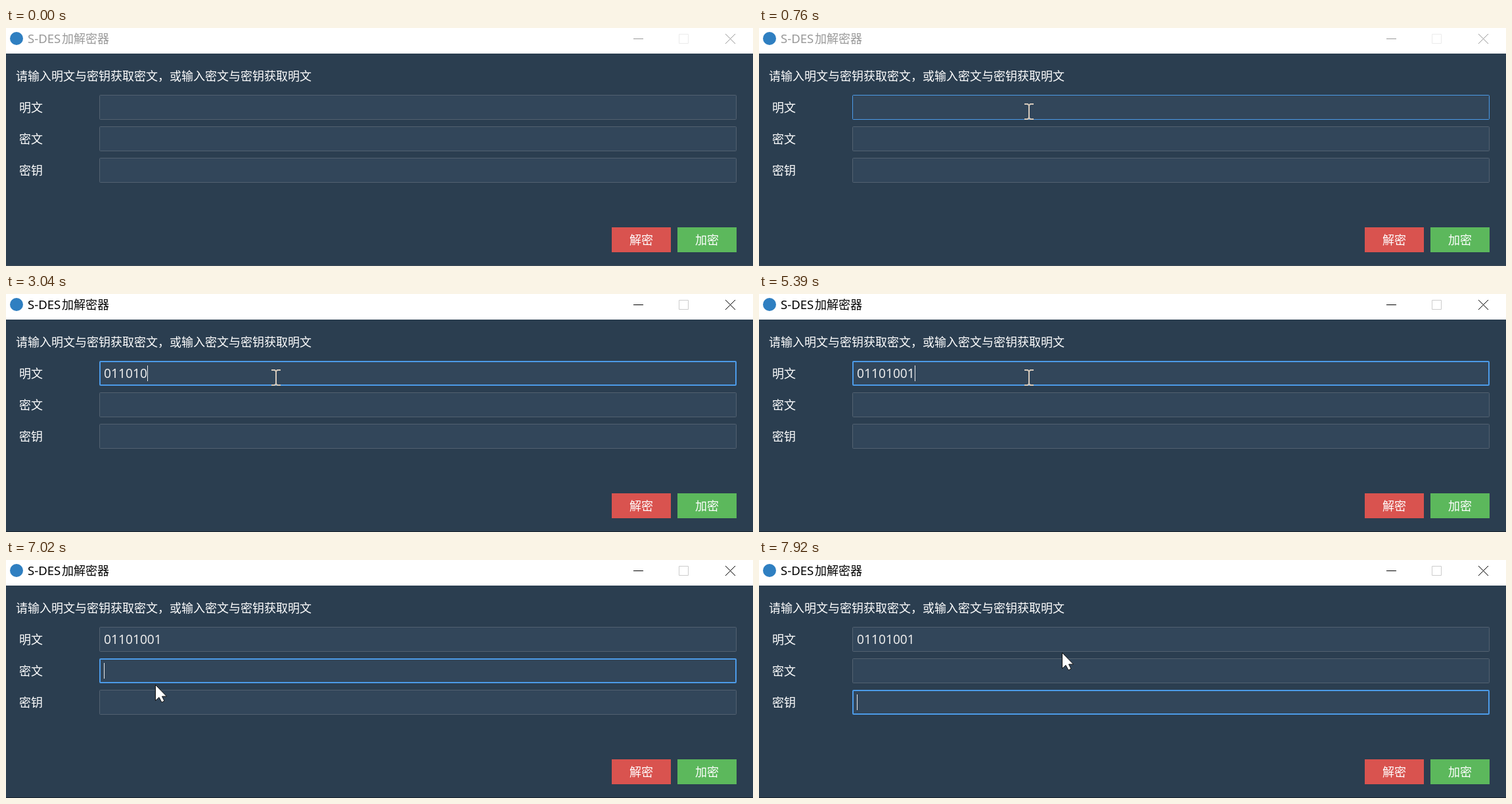
Recreate the animation shown at these times as an HTML page. Size 1137 by 363 pixels, loop 7990 ms.

```html
<!DOCTYPE html>
<html lang="zh-CN">
<head>
<meta charset="utf-8">
<title>S-DES加解密器</title>
<style>
html, body { margin: 0; width: 100%; height: 100%; overflow: hidden; background: #2b3e50; }
svg { display: block; width: 1137px; height: 363px; }
text { font: 18px "Noto Sans CJK SC", "Noto Sans CJK", sans-serif; fill: #fff; white-space: pre; }
.latin { font: 18.6px "Noto Sans", "Open Sans", sans-serif; }
.value { font: 19.2px "Noto Sans", "Open Sans", sans-serif; fill: #ebebeb; }
.button { text-anchor: middle; }
.field { fill: #32465a; stroke: #526170; }
.field.hover, .field.focus { stroke: #4c9be8; }
.field.focus { stroke-width: 2; }
#bar text { fill: var(--ink); }
#bar path { fill: none; stroke: var(--ink); }
#bar .max { stroke: var(--max); }
</style>
</head>
<body>
<svg viewBox="0 0 1137 363">
  <rect width="1137" height="363" fill="#2b3e50"/>
  <rect id="edge" y="362" width="1137" height="1"/>
  <g id="bar">
    <rect width="1137" height="39" fill="#fff"/>
    <circle cx="16" cy="16" r="10" fill="#2f7fc1"/>
    <text class="latin" x="33" y="23">S-DES</text>
    <text x="85" y="23">加解密器</text>
    <path d="M955 16.5h15"/>
    <path class="max" d="M1024.5 9.5h14v14h-14z"/>
    <path d="M1095 9l15 15M1110 9l-15 15"/>
  </g>
  <text x="15" y="80">请输入明文与密钥获取密文，或输入密文与密钥获取明文</text>
  <text x="20" y="128">明文</text>
  <text x="20" y="176">密文</text>
  <text x="20" y="224">密钥</text>
  <rect class="field"/>
  <rect class="field"/>
  <rect class="field"/>
  <text id="value" class="value" x="149" y="128"></text>
  <rect id="caret" width="1" height="24" fill="#ebebeb"/>
  <rect x="922" y="304" width="90" height="38" fill="#d9534f"/>
  <text class="button" x="967" y="330">解密</text>
  <rect x="1022" y="304" width="90" height="38" fill="#5cb85c"/>
  <text class="button" x="1067" y="330">加密</text>
  <path id="arrow" d="M.5 .5V24.5L6 19.5L10 27L14 25L10.5 18H17.5Z" fill="#fff" stroke="#111"/>
  <path id="beam" d="M-7-11h5l2 2v19l-2 2h-5M7-11h-5l-2 2v19l2 2h5" fill="none" stroke="#d5c9bb" stroke-width="2"/>
</svg>
<script>
const LOOP = 7990, STEP = 70;
const $ = id => document.getElementById(id);
const fields = [...document.querySelectorAll('.field')];
const fieldTop = i => 102 + 48 * i;

// Pointer moves: start, end, x and y reached; it rests in between
const moves = [
  [130, 130, 690, 350],
  [130, 760, 411, 127],
  [5520, 5800, 612, 193],
  [5800, 6010, 366, 166],
  [6010, 6360, 304, 162],
  [6670, 7020, 227, 190],
  [7020, 7160, 234, 212],
  [7430, 7920, 461, 141]
];
const clicks = [830, 6490, 7370];
const keys = [1630, 1700, 1970, 2230, 2570, 3040, 4120, 4660];
const message = '01101001';

const passed = (times, t) => times.filter(at => at <= t).length;
const ease = u => u * u * (3 - 2 * u);

function pointerAt(t) {
  const i = moves.findLastIndex(m => m[0] <= t);
  if (i < 0) return null;
  const [start, end, x, y] = moves[i];
  if (t >= end) return [x, y];
  const [, , x0, y0] = moves[i - 1];
  const k = ease(Math.floor((t - start) / STEP) * STEP / (end - start));
  return [x0 + (x - x0) * k, y0 + (y - y0) * k].map(Math.round);
}

function place(el, shown, x, y) {
  el.style.display = shown ? '' : 'none';
  if (shown) el.setAttribute('transform', `translate(${x} ${y})`);
}

function drawField(el, i, focus, hover) {
  const inset = focus ? 1 : 0.5;
  const box = { x: 142 + inset, y: fieldTop(i) + inset, width: 970 - 2 * inset, height: 38 - 2 * inset, rx: 1 };
  for (const name in box) el.setAttribute(name, box[name]);
  el.classList.toggle('focus', focus);
  el.classList.toggle('hover', hover);
}

function draw(t) {
  const pos = pointerAt(t);
  const [x, y] = pos || [0, 0];
  const over = fields.findIndex((_, i) => x >= 142 && x < 1112 && y >= fieldTop(i) && y < fieldTop(i) + 38);
  const focus = passed(clicks, t) - 1;
  const typed = passed(keys, t);

  fields.forEach((el, i) => drawField(el, i, i === focus, i === over));
  $('value').textContent = message.slice(0, typed);

  // Caret: 600 ms on, 300 ms off, restarted by each click
  const lit = focus >= 0 && (t - clicks[focus]) % 900 < 600;
  place($('caret'), lit, 149 + (focus === 0 ? 11 * typed : 0), fieldTop(focus) + 7);
  place($('arrow'), pos && over < 0, x, y);
  place($('beam'), pos && over >= 0, x, y);

  const active = t >= 900;
  $('bar').style.setProperty('--ink', active ? '#000' : '#999');
  $('bar').style.setProperty('--max', active ? '#ccc' : '#ebebeb');
  $('edge').setAttribute('fill', active ? '#17222c' : '#3d4c5a');
}

const start = performance.now();
function tick() {
  draw((performance.now() - start) % LOOP);
  requestAnimationFrame(tick);
}
tick();
</script>
</body>
</html>
```
